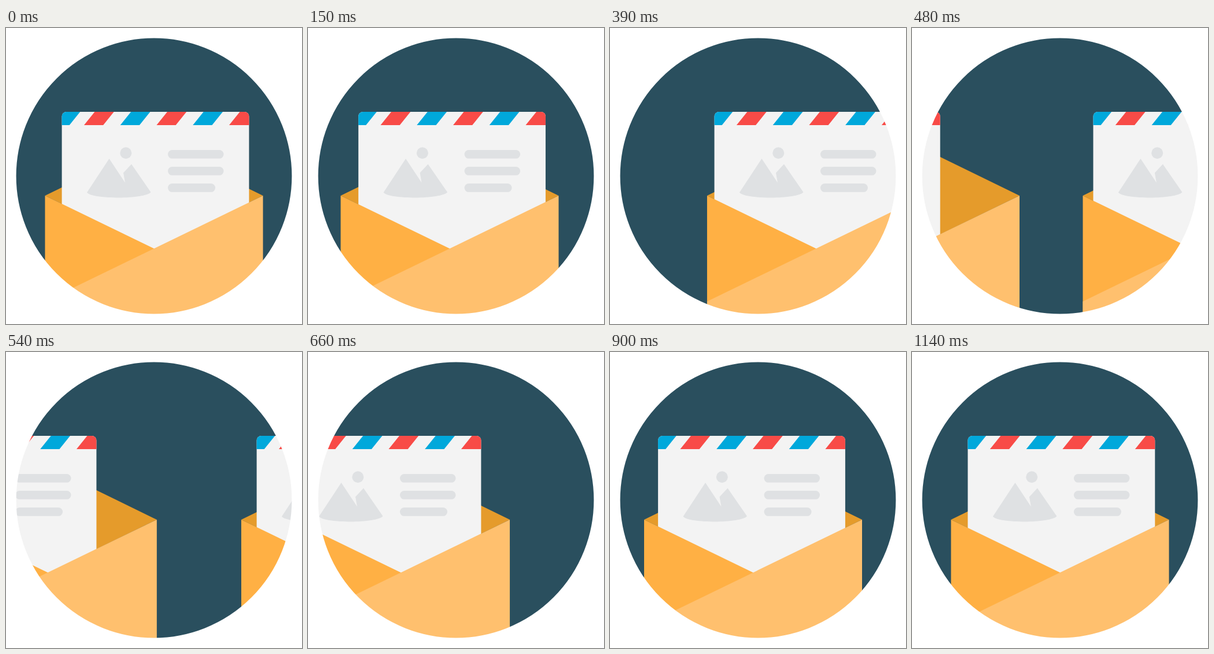
These frames come from a looping animation (512 px wide and 512 px high, 2140 ms). An HTML page:

```html
<!DOCTYPE html>
<html lang="en">
<head>
<meta charset="utf-8">
<title>Airmail</title>
<style>
  html, body { margin: 0; width: 100%; height: 100%; overflow: hidden; background: #fff; }
  svg { display: block; width: 100%; height: 100%; }
  .grey { fill: #dfe1e3; }
</style>
</head>
<body>
<svg viewBox="0 0 512 512">
  <defs>
    <clipPath id="sheet"><rect x="96.6" y="145" width="323.8" height="260" rx="8"/></clipPath>

    <path id="back" d="M67.5 290L256 198L444.5 290L256 382z" fill="#e59b2b"/>

    <g id="letter" clip-path="url(#sheet)">
      <rect x="96" y="145" width="326" height="237" fill="#f3f3f3"/>
      <g id="stripes"></g>
      <g class="grey">
        <circle cx="207.3" cy="216.2" r="10"/>
        <path d="M140 284.5L178.5 226L206 267.5L203 250.5L217 235.5L250.5 284C246 290 220 293.5 195 293.5S144 290.5 140 284.5z"/>
        <rect x="280" y="211" width="96.5" height="14.8" rx="7.4"/>
        <rect x="280" y="240" width="96.5" height="14.8" rx="7.4"/>
        <rect x="280" y="269" width="82" height="14.8" rx="7.4"/>
      </g>
    </g>

    <g id="front">
      <path d="M67.5 290L256 381.5L300 500H67.5z" fill="#ffb044"/>
      <path d="M444.5 290L67.5 473V500H444.5z" fill="#ffc06e"/>
    </g>
  </defs>

  <rect width="512" height="512" fill="#2a4f5e"/>
  <g class="pass"><use href="#back"/><use href="#letter"/><use href="#front"/></g>
  <g class="pass"><use href="#back"/><use href="#letter"/><use href="#front"/></g>

  <!-- white surround leaves a round window -->
  <circle cx="256" cy="256" r="388.4" fill="none" stroke="#fff" stroke-width="300"/>
</svg>
<script>
  const LOOP = 2140, REST = 1140, TICK = 30;

  // Slanted airmail stripes; the two at the corners are wider
  let stripes = '';
  for (let i = 0; i < 6; i++) {
    const x = 90.7 + 62.75 * i, w = i % 5 ? 33.2 : 37.5;
    stripes += `<path d="M${x} 145h${w}l-18.5 23h${-w}z" fill="${i % 2 ? '#f84b47' : '#00a8db'}"/>`;
  }
  document.getElementById('stripes').innerHTML = stripes;

  // Lean back until the turn, then accelerate away to the right
  const LEAN = 12.5;
  const leave = (t, turn, accel) => t < turn
    ? -LEAN * (1 - Math.cos(Math.PI * t / turn)) / 2
    : -LEAN + accel * (t - turn) ** 2;

  // Brake from the left along a power curve
  const arrive = (t, end, rate, power) => -((Math.max(0, end - t) * rate) ** power);

  // Extra speed of the envelope while it enters
  const rush = t => 0.005 * Math.max(0, 540 - t) ** 2;

  const motions = [
    {
      envelope: t => leave(t, 194, 0.00294),
      letter: t => leave(t, 224, 0.0035)
    },
    {
      envelope: t => arrive(t, 1033.4, 0.01863, 2.35) - rush(t),
      letter: t => arrive(t, 1255.5, 0.00519, 4.25)
    }
  ];

  const passes = [...document.querySelectorAll('.pass')];
  const start = performance.now();

  function draw(now) {
    const elapsed = Math.max(0, now - start) % LOOP;
    const t = Math.min(REST, Math.floor(elapsed / TICK) * TICK);
    passes.forEach((pass, i) => {
      const { envelope, letter } = motions[i];
      const [back, sheet, front] = pass.children;
      back.setAttribute('x', envelope(t));
      sheet.setAttribute('x', letter(t));
      front.setAttribute('x', envelope(t));
    });
    requestAnimationFrame(draw);
  }
  draw(start);
</script>
</body>
</html>
```
